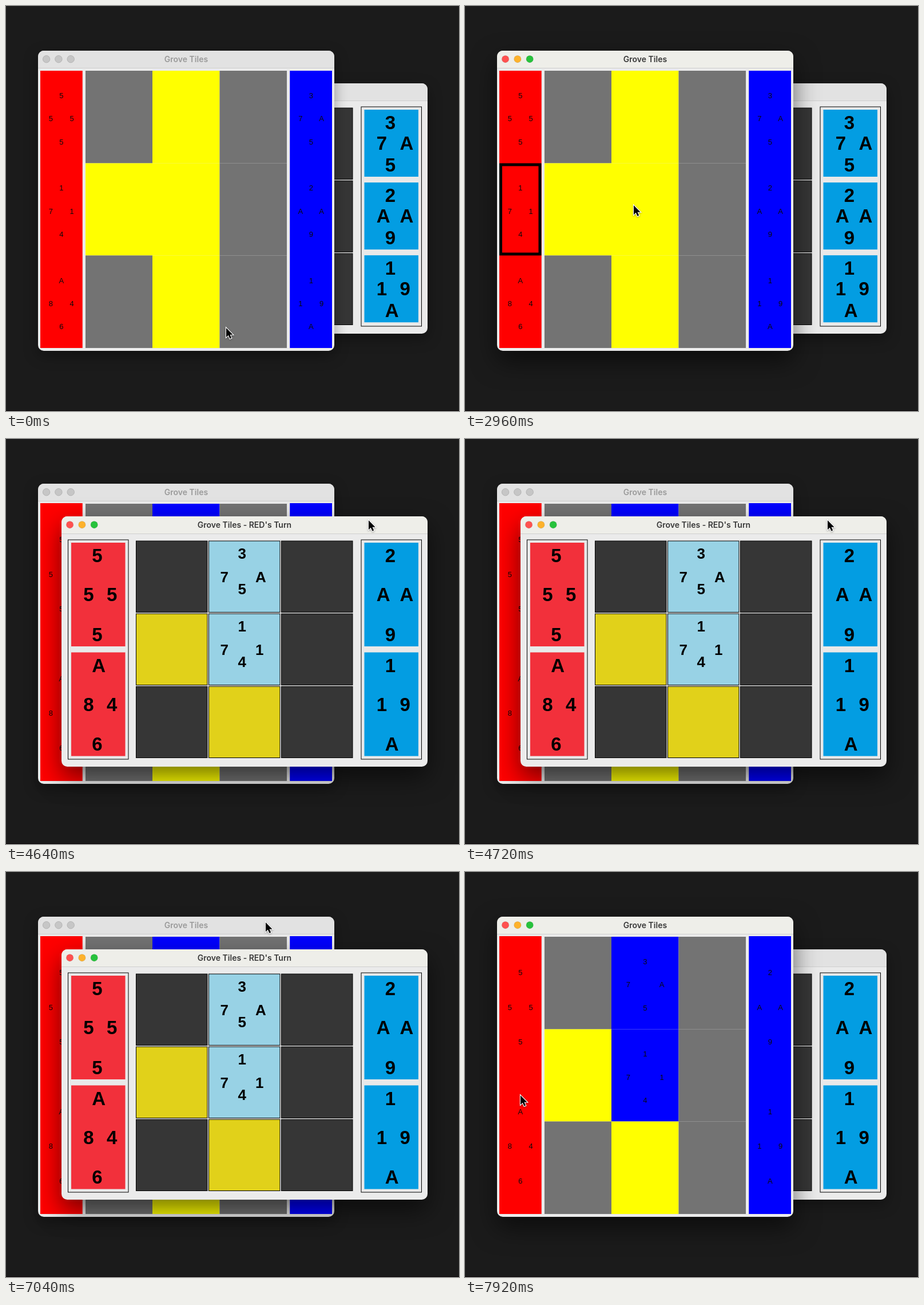
Recreate the animation shown at these times as an HTML page with a canvas. Size 792 by 707 pixels, loop 8000 ms.

```html
<!DOCTYPE html>
<html lang="en">
<head>
<meta charset="utf-8">
<style>
  html, body { margin: 0; overflow: hidden; background: #1b1b1b; }
  canvas { display: block; }
</style>
</head>
<body>
<canvas id="stage" width="792" height="707"></canvas>
<script>
const ctx = document.getElementById('stage').getContext('2d');
const LOOP = 8000, SELECT = 1520, PLAY = 3040;
const TITLE = 'Grove Tiles';
const SMALL = '13px "Liberation Sans", Arial, sans-serif';
const bold = size => `bold ${size}px "Liberation Sans", Arial, sans-serif`;

// Card values are listed north, west, east, south.
const before = { red: ['5555', '1714', 'A846'], blue: ['37A5', '2AA9', '119A'], board: {} };
const after = { red: ['5555', 'A846'], blue: ['2AA9', '119A'], board: { '1,0': '37A5', '1,1': '1714' } };
const isSlot = (col, row) => col === 1 || (col === 0 && row === 1);

// Cursor stops: time, x, y
const path = [
  [0, 384, 561], [960, 98, 364], [1120, 97, 361], [2160, 97, 361], [2800, 294, 347],
  [3400, 294, 347], [3920, 643, 247], [4240, 633, 141], [4800, 633, 141],
  [5440, 412, 300], [6320, 412, 300], [6960, 453, 87], [7280, 453, 87], [7920, 96, 389]
];

function cursorAt(t) {
  const i = path.findIndex(stop => stop[0] > t);
  if (i < 0) return path[path.length - 1].slice(1);
  const [t0, x0, y0] = path[i - 1], [t1, x1, y1] = path[i];
  const u = (t - t0) / (t1 - t0), k = u * u * (3 - 2 * u);
  return [x0 + (x1 - x0) * k, y0 + (y1 - y0) * k];
}

function rect(x, y, w, h, fill) {
  ctx.fillStyle = fill;
  ctx.fillRect(x, y, w, h);
}

function framed(x, y, w, h, fill) {
  rect(x, y, w, h, '#000');
  rect(x + 1, y + 1, w - 2, h - 2, fill);
}

function text(str, x, y, font, align = 'left', fill = '#000') {
  ctx.font = font;
  ctx.textAlign = align;
  ctx.fillStyle = fill;
  ctx.fillText(str, x, y);
}

function drawWindow(x, y, w, h, title, active, content) {
  ctx.save();
  ctx.shadowColor = `rgba(0,0,0,${active ? 0.55 : 0.35})`;
  ctx.shadowBlur = active ? 44 : 24;
  ctx.shadowOffsetY = active ? 18 : 8;
  ctx.beginPath();
  ctx.roundRect(x, y, w, h, 10);
  ctx.fillStyle = '#ebebeb';
  ctx.fill();
  ctx.restore();

  ctx.save();
  ctx.clip();
  rect(x, y, w, 30, active ? '#eeeee9' : '#e2e2e2');
  rect(x, y + 30, w, 1, '#cfcfcf');
  const lights = active ? ['#ff5150', '#fdb22c', '#27c23c'] : ['#c6c6c6', '#c6c6c6', '#c6c6c6'];
  lights.forEach((color, i) => {
    ctx.beginPath();
    ctx.arc(x + 14.6 + i * 21.3, y + 14.7, 6.2, 0, Math.PI * 2);
    ctx.fillStyle = color;
    ctx.fill();
    ctx.strokeStyle = active ? 'rgba(0,0,0,.1)' : '#b3b3b3';
    ctx.lineWidth = 1;
    ctx.stroke();
  });
  text(title, x + w / 2, y + 19.5, '600 14px Inter, sans-serif', 'center', active ? '#383838' : '#9a9a9a');
  content();
  ctx.restore();
}

function plainCard(card, x, y, w, h, fill) {
  rect(x, y, w, h, fill);
  [[2, 1], [1, 2], [3, 2], [2, 3]].forEach(([cx, cy], i) =>
    text(card[i], x + w * cx / 4, y + h * cy / 4 + 7.5, SMALL, 'center', '#0a0a0a'));
}

function plainView(state, selected) {
  const hand = (cards, x, fill) => {
    const top = cards.length === 2 ? 112 : 113, h = (597 - top) / cards.length;
    rect(x, top, 73.5, 597 - top, fill);
    cards.forEach((card, i) => plainCard(card, x, top + h * i, 73.5, h, fill));
  };
  hand(state.red, 60, '#f00');
  hand(state.blue, 496.5, '#00f');
  if (selected) {
    ctx.strokeStyle = '#000';
    ctx.lineWidth = 5;
    ctx.strokeRect(62.5, 277, 68.5, 156);
  }
  const xs = [139, 256, 373.5, 491], ys = [113, 274.5, 435.5, 597];
  for (let c = 0; c < 3; c++) for (let r = 0; r < 3; r++) {
    const box = [xs[c], ys[r], xs[c + 1] - xs[c], ys[r + 1] - ys[r]];
    const card = state.board[[c, r]];
    if (card) plainCard(card, ...box, '#00f');
    else rect(...box, isSlot(c, r) ? '#ff0' : '#737373');
  }
}

function boldCard(card, x, size, spots) {
  spots.forEach(([dx, y], i) => text(card[i], x + dx, y, bold(size)));
}

function styledView(state) {
  const hand = (cards, x, fill) => {
    framed(x, 175.5, 106.5, 384, '#e9e9e9');
    const [h, pitch] = cards.length === 2 ? [181, 191.5] : [117, 127.1];
    const left = x + 6;
    cards.forEach((card, i) => {
      const y = 181 + pitch * i;
      rect(left, y, 94.5, h, fill);
      boldCard(card, left, 33, [[36.3, y + 34], [21.2, y + h / 2 + 11.7], [62, y + h / 2 + 11.7], [36.3, y + h - 9.5]]);
    });
  };
  hand(state.red, 108, '#f2303b');
  hand(state.blue, 620.5, '#039de2');
  for (let c = 0; c < 3; c++) for (let r = 0; r < 3; r++) {
    const x = 227 + 127 * c, y = 177.5 + 127 * r;
    const card = state.board[[c, r]];
    framed(x, y, 125.5, 125.5, card ? '#98d2e5' : isSlot(c, r) ? '#e1d11a' : '#363636');
    if (card) boldCard(card, x, 26, [[51.5, y + 31], [20.5, y + 72.5], [82, y + 72.5], [51.5, y + 93.5]]);
  }
}

const arrow = new Path2D('M1 1V17.2L4.8 13.7L7.5 19.8L10.2 18.6L7.5 12.7H12.6Z');

function drawCursor(x, y) {
  ctx.save();
  ctx.translate(x, y);
  ctx.shadowColor = 'rgba(0,0,0,.35)';
  ctx.shadowBlur = 3;
  ctx.shadowOffsetY = 1;
  ctx.strokeStyle = '#fff';
  ctx.lineWidth = 2.2;
  ctx.stroke(arrow);
  ctx.restore();
  ctx.save();
  ctx.translate(x, y);
  ctx.fillStyle = '#000';
  ctx.fill(arrow);
  ctx.restore();
}

function draw(now) {
  const t = now % LOOP;
  const state = t < PLAY ? before : after;
  const styledInFront = t >= 4560 && t < 7120;
  const plainActive = t >= 1360 && !styledInFront;
  const plain = () => drawWindow(56, 78, 518, 524, TITLE, plainActive,
    () => plainView(state, t >= SELECT && t < PLAY));
  const styled = () => drawWindow(97, 135, 640, 437, TITLE + " - RED's Turn", styledInFront,
    () => styledView(state));

  rect(0, 0, 792, 707, '#1b1b1b');
  rect(0, 706, 792, 1, '#0b0608');
  (styledInFront ? [plain, styled] : [styled, plain]).forEach(paint => paint());
  drawCursor(...cursorAt(t));
  requestAnimationFrame(draw);
}
requestAnimationFrame(draw);
</script>
</body>
</html>
```
